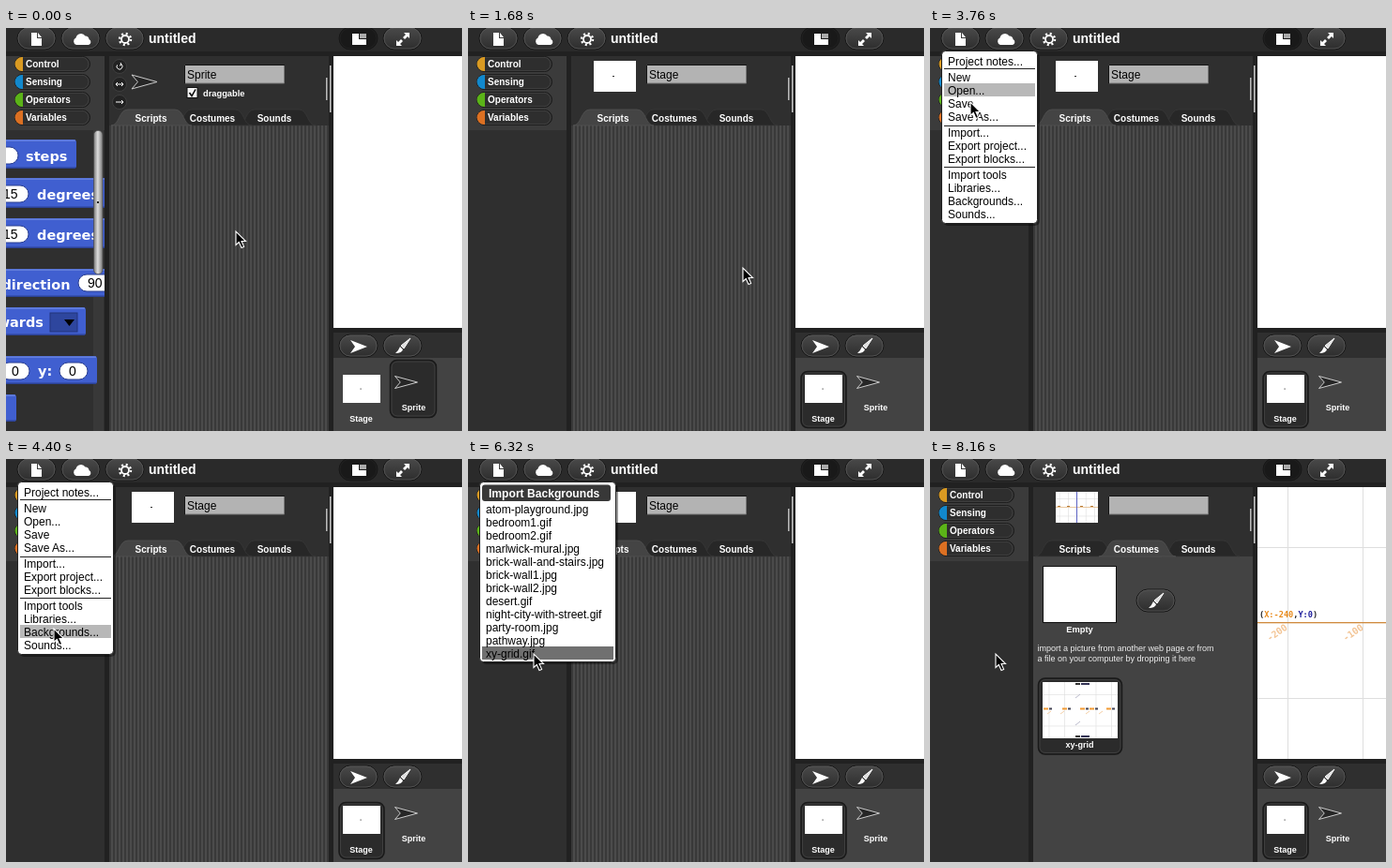
An HTML page for the animation above (8400 ms loop, 486x430 px).

```html
<!DOCTYPE html>
<html lang="en">
<head>
<meta charset="utf-8">
<title>Block editor</title>
<style>
html, body { margin: 0; width: 100%; height: 100%; overflow: hidden; background: #212121; }
svg { display: block; width: 486px; height: 430px; }
text { font-family: "Liberation Sans", Arial, sans-serif; white-space: pre; }
.b { font-weight: bold; fill: #fff; }
.block { font: bold 14.5px "DejaVu Sans", Verdana, sans-serif; fill: #fff; }
.mono { font: bold 8.6px "DejaVu Sans Mono", monospace; }
</style>
</head>
<body>
<svg id="view" viewBox="0 0 486 430" xmlns="http://www.w3.org/2000/svg"></svg>
<script>
const LOOP = 8400, STEP = 80;

// Moments at which the interface changes
const HOVER = 880, SELECT = 1360, OVER = 2560, MENU = 2960, PRESS = 4720,
      IMPORT = 5120, PICK = 6320, CLOSE = 6480, LOADED = 6560;

// Pointer path: time, x, y, easing exponents for leaving and arriving
const path = [
  [0, 245, 217], [960, 374, 381, 1.3, 1.8], [1280, 374, 381], [1760, 269, 220, 1.4, 1],
  [2480, 41, 21, 1, 1.3], [2720, 30, 13], [3360, 30, 13], [3760, 43, 79],
  [4160, 51, 178], [4480, 51, 182], [5360, 51, 182], [6000, 69.5, 208, 1.2, 1.5], [LOOP, 69.5, 208]
];

const fileMenu = [
  [40, 'Project notes...'], [57, 'New'], [71, 'Open...'], [85, 'Save'], [99, 'Save As...'],
  [116, 'Import...'], [130, 'Export project...'], [144, 'Export blocks...'],
  [161, 'Import tools'], [175, 'Libraries...'], [189, 'Backgrounds...'], [203, 'Sounds...']
];
const importMenu = [
  'atom-playground.jpg', 'bedroom1.gif', 'bedroom2.gif', 'marlwick-mural.jpg',
  'brick-wall-and-stairs.jpg', 'brick-wall1.jpg', 'brick-wall2.jpg', 'desert.gif',
  'night-city-with-street.gif', 'party-room.jpg', 'pathway.jpg', 'xy-grid.gif'
].map((name, i) => [58 + i * 14, name]);

const rect = (x, y, w, h, fill, more = '') =>
  `<rect x="${x}" y="${y}" width="${w}" height="${h}" fill="${fill}" ${more}/>`;
const text = (x, y, size, str, more = '') =>
  `<text x="${x}" y="${y}" font-size="${size}" ${more}>${str}</text>`;
const bold = (x, y, size, str, anchor = 'start') =>
  text(x, y, size, str, `class="b" text-anchor="${anchor}"`);
const shape = (d, fill, more = '') => `<path d="${d}" fill="${fill}" ${more}/>`;
const group = (id, body) => `<g id="${id}">${body}</g>`;

const pill = (x, y, dark) =>
  rect(x, y, 41, 24, dark ? '#191919' : 'url(#pill)', 'rx="12" stroke="#171717"') +
  rect(x + 1, y + 1, 39, 22, 'none', `rx="11" stroke="${dark ? '#242424' : '#5a5a5a'}" stroke-width=".8"`);
const brush = (x, y) =>
  shape(`M${x + 8} ${y - 8}L${x - 2} ${y}L${x + 1} ${y + 3}Z`, '#ddd', 'stroke="#fff"') +
  shape(`M${x - 3} ${y + 1}l3 3q-1 4 -8 4q3 -2 5 -7z`, '#fff');
const dart = (x, y, w, h) =>
  shape(`M${x} ${y}L${x + w} ${y + h / 2}L${x} ${y + h}L${x + w * .24} ${y + h / 2}Z`, '#262626', 'stroke="#ccc"');
const frame = (x, y, w, h) =>
  rect(x, y, w, h, '#2b2b2b', 'rx="7" stroke="#191919" stroke-width="1.5"') +
  rect(x + 1.5, y + 1.5, w - 3, h - 3, 'none', 'rx="6" stroke="#484848" stroke-width=".7"');

function category(i, name, color) {
  const y = 30.5 + i * 19;
  return rect(9.5, y, 80, 16, '#2e2e2e', 'rx="8" stroke="#191919"') +
    rect(11, y + .8, 77, 14.4, 'none', 'rx="7" stroke="#505050" stroke-width=".6"') +
    shape(`M17 ${y + .5}h1v15h-1a7.5 7.5 0 0 1 0 -15z`, color) + bold(21, y + 11.5, 10, name);
}

function block(y, h, right) {
  return rect(-8, y, right + 8, h, '#405fd0', 'rx="3"') +
    rect(-8, y + .5, right + 7, 1.2, '#6f8ae4') + rect(-8, y + h - 1.5, right + 7, 1.5, '#2c4296');
}
const slot = (x, y, w, str, tx) =>
  rect(x, y, w, 18, '#fff', 'rx="9" stroke="#2b3f90"') + text(tx, y + 14, 14, str);

function palette() {
  const label = (x, y, s, end) => `<text class="block" x="${x}" y="${y}" text-anchor="${end ? 'end' : 'start'}">${s}</text>`;
  let s = rect(93, 109, 11, 321, '#383838');
  s += block(119, 31, 75) + slot(-25, 127, 38, '', 0) + label(21, 142, 'steps');
  for (const y of [160, 203])
    s += block(y, 32, 108) + slot(-14, y + 8, 38, '15', -3) + label(33, y + 23, 'degrees');
  s += block(257, 30, 108) + label(68.5, 279, 'direction', 1) + slot(77, 263, 40, '90', 87);
  s += block(298, 30, 85) + label(40, 319, 'towards', 1) +
    rect(47, 304, 29, 20, '#2e469e', 'stroke="#22357c"') + shape('M62 311h11l-5.500 7z', '#000');
  s += block(350, 30, 97) + slot(-6, 357, 31, '0', 6) + label(34, 371, 'y:') + slot(57, 357, 30, '0', 67);
  s += block(391, 29, 11);
  return `<g clip-path="url(#pal)">${s}</g>` + rect(93.5, 109.5, 9.5, 153, 'url(#bar)', 'rx="4.5" stroke="#444" stroke-width=".6"') +
    rect(97, 185, 2, 2, '#222');
}

function tab(x1, x2, tx, name, on) {
  return shape(`M${x1} 104C${x1 + 9} 104 ${x1 + 8} 87 ${x1 + 18} 87H${x2 - 18}C${x2 - 8} 87 ${x2 - 9} 104 ${x2} 104Z`,
    on ? '#444' : '#272727', `stroke="${on ? '#555' : '#3a3a3a'}" stroke-width=".7"`) + bold(tx, 99.5, 10, name, 'middle');
}
function tabs(on) {
  const list = [[112, 198, 154.5, 'Scripts'], [180, 262, 220, 'Costumes'], [247, 330, 286, 'Sounds']];
  const order = [2, 1, 0].filter(i => i !== on).concat(on);
  return order.map(i => tab(...list[i], i === on)).join('');
}

function menu(id, right, bottom, rows, extra) {
  const w = right - 12;
  return group(id,
    rect(14, 27, w + 1, bottom - 25, '#000', 'rx="5" opacity=".4"') +
    rect(12.5, 24.500, w, bottom - 25, '#fff', 'rx="4" stroke="#222"') +
    rect(15, 0, w - 5, 14, '#b8b8b8', `id="${id}Row"`) + extra +
    rows.map(([y, s]) => text(19, y, 12, s)).join(''));
}

// Small copy of the coordinate picture
function miniGrid(x, y, w, h) {
  let s = rect(x, y, w, h, '#fff');
  for (const k of [1 / 12, 7 / 24, 17 / 24, 11 / 12]) s += rect(x + w * k, y, .6, h, '#ddd');
  for (const k of [2 / 9, 7 / 9]) s += rect(x, y + h * k, w, .6, '#ddd');
  return s;
}
function costumes() {
  let s = rect(110, 104, 234, 326, '#434343') +
    rect(120.5, 114.5, 78, 60, '#fff', 'stroke="#111"') + bold(159.5, 185, 9.3, 'Empty', 'middle') +
    pill(220, 139) + brush(241, 151) +
    text(114.5, 205, 9, 'import a picture from another web page or from', 'fill="#eee"') +
    text(114.5, 216, 9, 'a file on your computer by dropping it here', 'fill="#eee"') +
    frame(115.5, 234, 89, 81) + miniGrid(120, 238, 80, 60) + bold(159.5, 308, 9, 'xy-grid', 'middle');
  for (const x of [121, 141, 160, 170, 188])
    s += rect(x, 265.5, 5, 2, '#f29a32') + rect(x + 6, 265.5, 3, 2, '#445');
  for (const y of [239, 295]) s += rect(155, y, 5, 2, '#333') + rect(161, y, 9, 2, '#335');
  for (const x of [125, 139, 166, 180]) s += shape(`M${x} 272l4 -3`, 'none', 'stroke="#f5cfa5"');
  for (const y of [255, 284]) s += shape(`M155 ${y}l5 -4`, 'none', 'stroke="#bbc"');
  return s;
}
function gridStage() {
  let s = '';
  for (const x of [381, 461]) s += rect(x, 30, 1, 290, '#dedede');
  for (const y of [94, 255]) s += rect(349, y, 137, 1, '#dedede');
  s += rect(349, 174, 137, 1.3, '#cf8a3c');
  s += `<text class="mono" x="351" y="169" fill="#222">(<tspan fill="#e88a1a">X:-240</tspan>,<tspan fill="#1c1c9c">Y:0</tspan>)</text>`;
  for (const [x, n] of [[362, -200], [443, -100]])
    s += `<text class="mono" fill="#f3c596" style="font-size:10px" transform="translate(${x} 195) rotate(-35)">${n}</text>`;
  return s;
}

const spin = ['M118.500 39.500a3 3 0 1 0 4 -1M122 37l1 2l-2 1', 'M117 60h8M119 58l-2 2l2 2M123 58l2 2l-2 2', 'M117 79h8M123 77l2 2l-2 2'];

const defs = `<defs>
  <linearGradient id="pill" x2="0" y2="1"><stop stop-color="#4a4a4a"/><stop offset="1" stop-color="#2d2d2d"/></linearGradient>
  <linearGradient id="bar"><stop stop-color="#777"/><stop offset=".45" stop-color="#ddd"/><stop offset="1" stop-color="#777"/></linearGradient>
  <pattern id="stripes" width="4" height="4" patternUnits="userSpaceOnUse">${rect(0, 0, 4, 4, '#4b4b4b')}${rect(2, 0, 2, 4, '#393939')}</pattern>
  <clipPath id="pal">${rect(0, 109, 105, 321, '#000')}</clipPath></defs>`;

const topBar = rect(0, 0, 486, 25, '#2a2a2a') + pill(12, -1) +
  group('hot', rect(14, 1, 37, 20, '#777', 'rx="10" opacity=".35"')) + pill(59, -1) + pill(106, -1) +
  pill(355, -1, true) + pill(402, -1) +
  shape('M27 5h6v6h5v8h-11zM34 5l4 5h-4z', '#fff') +
  shape('M75 18a4 4 0 0 1 -.5 -7.500a5.500 5.500 0 0 1 10 -2a4 4 0 0 1 4 3.500a3.200 3.200 0 0 1 -.5 6z', '#fff') +
  '<g fill="none" stroke="#fff"><circle cx="127" cy="12" r="4" stroke-width="1.8"/><circle cx="127" cy="12" r="6" stroke-width="2.4" stroke-dasharray="2 2.712"/></g>' +
  shape('M369 6h7v6h8v6h-15z', '#fff') + rect(377, 6, 7, 5, '#aaa') +
  shape('M430 5v6l-2 -2l-3 3l-2 -2l3 -3l-2 -2zM416 19v-6l2 2l3 -3l2 2l-3 3l2 2z', '#fff') +
  bold(152, 16, 14, 'untitled');

const spriteBar = rect(110, 30, 234, 74, '#2f2f2f') +
  rect(190, 39, 107, 20, '#b3b3b3') + shape('M190.500 59V39.500H297', 'none', 'stroke="#151515"') +
  shape('M191 59H296.500V40', 'none', 'stroke="#777"') +
  group('spriteInfo',
    spin.map((d, i) => `<circle cx="121" cy="${41 + 19 * i}" r="7.500" fill="#222" stroke="#484848" stroke-width=".7"/>` +
      shape(d, 'none', 'stroke="#fff"')).join('') +
    dart(134, 50, 27, 15) + text(193, 54, 12, 'Sprite') +
    rect(193, 63.500, 11, 11, '#f4f4f4', 'stroke="#111"') + shape('M195.500 69l2.500 3.500l4 -7', 'none', 'stroke="#000" stroke-width="1.500"') +
    bold(210, 72.500, 9.3, 'draggable')) +
  group('stageInfo', rect(134, 35, 45, 33, '#fff') + rect(154, 51, 2, 1, '#333') + text(193, 54, 12, 'Stage')) +
  group('gridInfo', miniGrid(134, 35, 45, 33) + rect(134, 51, 45, .8, '#e5bd8c') + rect(156, 35, 1, 33, '#5c62c4') +
    [136, 146, 160, 171].map(x => rect(x, 50, 3, 1, '#b87b35')).join(''));

const corral = rect(349, 325, 137, 27, '#2f2f2f') + rect(349, 352, 137, 78, '#434343') +
  pill(355, 327) + pill(402, 327) + shape('M367 333L385 340L367 347L372 340Z', '#fff') + brush(423, 339) +
  group('stageFrame', frame(355, 366.500, 48, 60)) + group('spriteFrame', frame(409.500, 354.500, 49, 61)) +
  rect(359, 370, 40, 30, '#fff') + rect(377.500, 384.500, 1.200, 1.200, '#555') + bold(378.500, 420, 9, 'Stage', 'middle') +
  dart(414.500, 371.500, 24, 13) + bold(434.500, 408, 9, 'Sprite', 'middle');

document.getElementById('view').innerHTML = defs + rect(0, 0, 486, 430, '#212121') + topBar +
  rect(0, 30, 105, 79, '#3b3b3b') + rect(0, 109, 105, 321, '#2f2f2f') +
  category(0, 'Control', '#d99a22') + category(1, 'Sensing', '#1288cc') +
  category(2, 'Operators', '#5bb318') + category(3, 'Variables', '#dc7022') +
  group('palette', palette()) + spriteBar +
  group('scripts', rect(110, 104, 234, 326, 'url(#stripes)') + tabs(0)) +
  group('costumes', costumes() + tabs(1)) +
  rect(349, 30, 137, 290, '#fff') + group('grid', gridStage()) +
  rect(341, 53, 1.500, 24, '#bbb') + rect(345, 40, 1.500, 50, '#ccc') + corral +
  menu('file', 114, 209, fileMenu, [43, 104, 148].map(y => rect(15, y, 97, 1, '#222')).join('')) +
  menu('import', 157, 217, importMenu, rect(15, 27.500, 137, 17.500, '#383838', 'rx="3"') + bold(22, 41, 12.100, 'Import Backgrounds')) +
  group('cursor', shape('M0 0V14.500L3.300 11.500L6 17.500L8.600 16.400L6 10.500H10.500Z', '#000', 'stroke="#fff" stroke-width="1.100"'));

const el = {};
document.querySelectorAll('[id]').forEach(e => el[e.id] = e);
const show = (id, on) => { el[id].style.display = on ? '' : 'none'; };

function pointer(t) {
  const i = Math.max(1, path.findIndex(p => p[0] >= t));
  const [t0, x0, y0] = path[i - 1], [t1, x1, y1, a = 1, b = 1] = path[i];
  const u = Math.pow((t - t0) / (t1 - t0), a), k = 1 - Math.pow(1 - u, b);
  return [x0 + (x1 - x0) * k, y0 + (y1 - y0) * k];
}

function highlight(id, rows, t, from, press) {
  const y = pointer(Math.max(0, t - STEP))[1];
  const row = rows.find(r => y >= r[0] - 12 && y < r[0] + 2);
  show(id, row && t >= from);
  if (row) el[id].setAttribute('y', row[0] - 12);
  el[id].setAttribute('fill', t >= press ? '#707070' : '#b8b8b8');
}

function draw(t) {
  t = Math.floor(t / STEP) * STEP;
  const [x, y] = pointer(t);
  el.cursor.setAttribute('transform', `translate(${Math.round(x)} ${Math.round(y)})`);
  show('stageFrame', t >= HOVER);
  for (const id of ['palette', 'spriteInfo', 'spriteFrame']) show(id, t < SELECT);
  show('stageInfo', t >= SELECT && t < LOADED);
  for (const id of ['gridInfo', 'costumes', 'grid']) show(id, t >= LOADED);
  show('scripts', t < LOADED);
  show('hot', t >= OVER && t < 3520);
  show('file', t >= MENU && t < IMPORT);
  show('import', t >= IMPORT && t < CLOSE);
  highlight('fileRow', fileMenu, t, 3440, PRESS);
  highlight('importRow', importMenu, t, 5440, PICK);
}

const start = performance.now();
function tick() {
  draw((performance.now() - start) % LOOP);
  requestAnimationFrame(tick);
}
tick();
</script>
</body>
</html>
```
